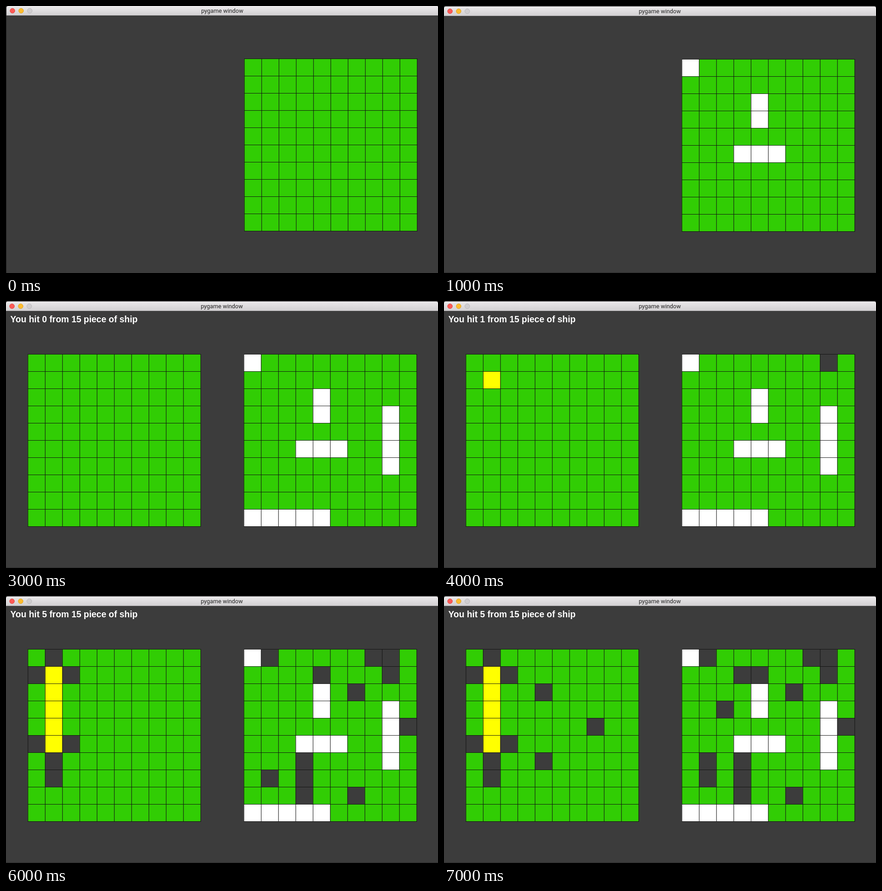
Recreate the animation shown at these times as an HTML page. Size 950 by 589 pixels, loop 8 s.

```html
<!DOCTYPE html>
<html lang="en">
<head>
<meta charset="utf-8">
<title>pygame window</title>
<style>
  html, body { margin: 0; width: 100%; height: 100%; overflow: hidden; background: #1c1c1c; }
  svg { display: block; width: 950px; height: 589px; }
  .title { font: 12.85px Roboto, sans-serif; fill: #222; }
  .score { font: bold 19.4px "Liberation Sans", Arial, sans-serif; fill: #fff; }
</style>
</head>
<body>
<svg viewBox="0 0 950 589">
  <defs>
    <linearGradient id="bar" x1="0" y1="0" x2="0" y2="1">
      <stop offset="0" stop-color="#ebe9eb"/>
      <stop offset="1" stop-color="#d1cfd1"/>
    </linearGradient>
  </defs>
  <g id="win">
    <rect y="10" width="950" height="580" fill="#3c3c3c"/>
    <path d="M0 22V5Q0 1 4 1H946Q950 1 950 5V22Z" fill="url(#bar)"/>
    <rect y="21" width="950" height="1" fill="#b8b6b8"/>
    <g stroke-width="1">
      <circle cx="13.2" cy="11.5" r="5.3" fill="#fc5b57" stroke="#e2443f"/>
      <circle cx="32.2" cy="11.5" r="5.3" fill="#fdbd2f" stroke="#dfa023"/>
      <circle cx="51.2" cy="11.5" r="5.3" fill="#d0ced0" stroke="#b9b7b9"/>
    </g>
    <text class="title" x="474.5" y="16" text-anchor="middle">pygame window</text>
    <text class="score" id="score" x="9.6" y="47"></text>
    <g id="left"></g>
    <g id="right"></g>
  </g>
  <rect id="edge" y="588" width="950" height="1" fill="#2a2a2a"/>
</svg>
<script>
const NS = 'http://www.w3.org/2000/svg';
const SIZE = 38, N = 10, TOP = 117, LINE = 0.95;
const GREEN = '#31cd04', WHITE = '#fff', YELLOW = '#ff0', MISS = '#3c3c3c';
const $ = id => document.getElementById(id);

// Each entry: second, board, colour, cells as "column row"
const moves = [
  [1, 'right', WHITE, '00 42 43 35 45 55'],
  [2, 'right', WHITE, '83 84 85 86'],
  [3, 'right', WHITE, '09 19 29 39 49'],
  [4, 'left', YELLOW, '11'],
  [4, 'right', MISS, '80'],
  [5, 'left', YELLOW, '12 13'],
  [5, 'right', MISS, '70 38'],
  [6, 'left', YELLOW, '14 15'],
  [6, 'left', MISS, '10 01 21 05 25 16 17'],
  [6, 'right', MISS, '10 41 81 62 94 36 17 37 68'],
  [7, 'left', MISS, '42 74 46'],
  [7, 'right', MISS, '31 23 16']
];
const hits = [0, 0, 0, 0, 1, 3, 5, 5];

function rect(parent, x, y, w, h, fill) {
  const r = document.createElementNS(NS, 'rect');
  Object.entries({ x, y, width: w, height: h, fill }).forEach(([k, v]) => r.setAttribute(k, v));
  return parent.appendChild(r);
}

function board(id, x0) {
  const g = $(id), cells = {}, span = N * SIZE;
  for (let r = 0; r < N; r++)
    for (let c = 0; c < N; c++)
      cells[`${c}${r}`] = rect(g, x0 + c * SIZE, TOP + r * SIZE, SIZE, SIZE, GREEN);
  for (let i = 0; i <= N; i++) {
    rect(g, x0 + i * SIZE, TOP, LINE, span + LINE, '#111');
    rect(g, x0, TOP + i * SIZE, span + LINE, LINE, '#111');
  }
  return cells;
}

const boards = { left: board('left', 47.8), right: board('right', 522.8) };
let shown = -1;

function draw(sec) {
  if (sec === shown) return;
  shown = sec;
  for (const b of Object.values(boards))
    for (const cell of Object.values(b)) cell.setAttribute('fill', GREEN);
  for (const [at, name, color, list] of moves)
    if (at <= sec)
      for (const key of list.split(' ')) boards[name][key].setAttribute('fill', color);
  const playing = sec >= 3;
  $('left').setAttribute('visibility', playing ? 'visible' : 'hidden');
  $('score').textContent = playing ? `You hit ${hits[sec]} from 15 piece of ship` : '';
  $('win').setAttribute('transform', sec < 1 ? 'translate(1 -1)' : 'translate(0 0)');
  $('edge').setAttribute('visibility', sec < 1 ? 'hidden' : 'visible');
}

let start;
function tick(now) {
  start ??= now;
  draw(Math.floor(((now - start) % 8000) / 1000));
  requestAnimationFrame(tick);
}
draw(0);
requestAnimationFrame(tick);
</script>
</body>
</html>
```
